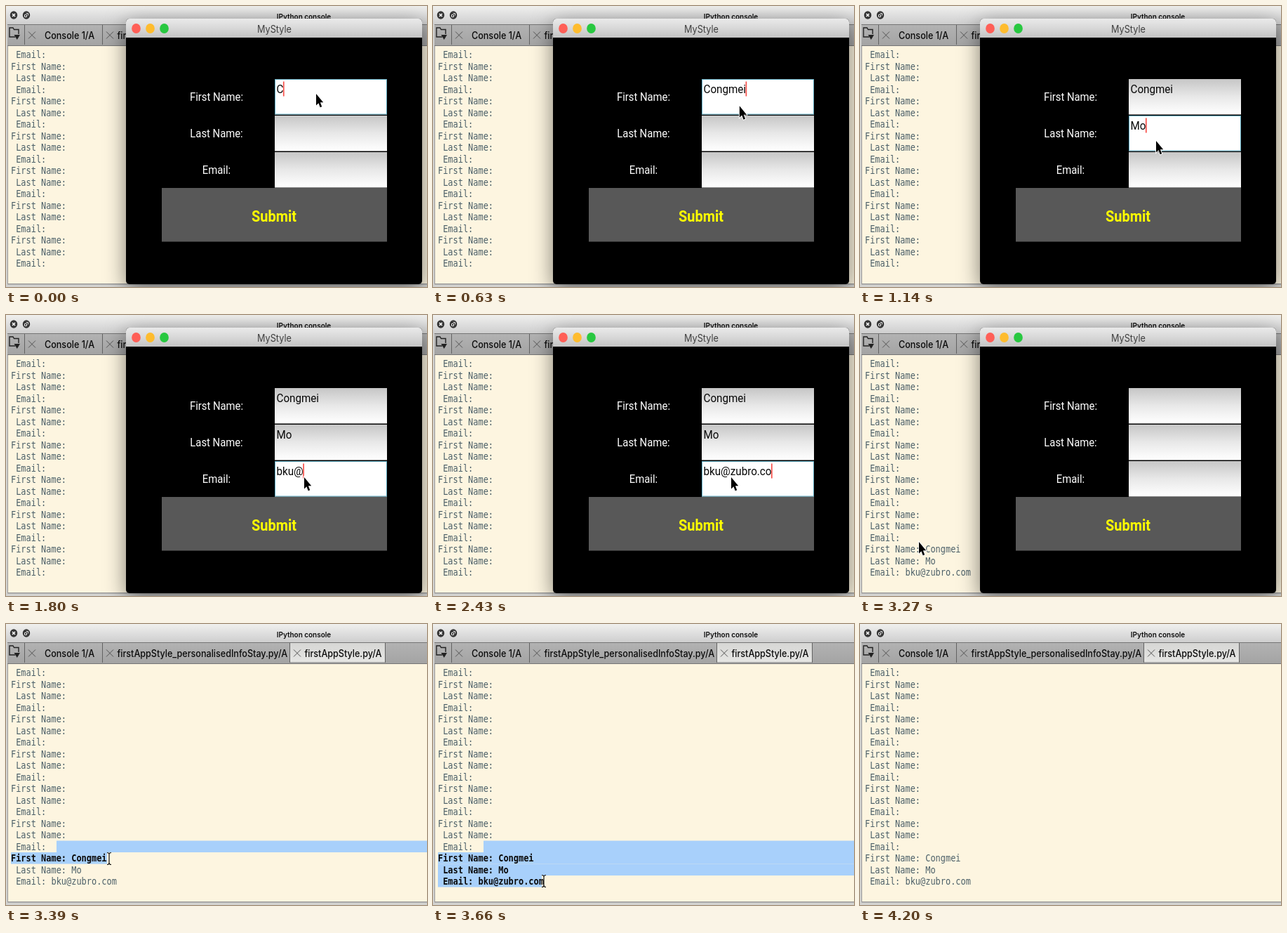
Write an HTML page with a canvas that moves like this. It is 600 px wide and 400 px high and loops after 4230 ms.

```html
<!DOCTYPE html>
<html lang="en">
<head>
<meta charset="utf-8">
<title>Form and console</title>
<style>
  html, body { margin: 0; width: 100%; height: 100%; overflow: hidden; background: #d2d2d0; }
  canvas { display: block; width: 600px; height: 400px; }
</style>
</head>
<body>
<canvas id="stage" width="600" height="400"></canvas>
<script>
const ctx = document.getElementById('stage').getContext('2d');
const LOOP = 4230, STEP = 30;
const SQUEEZE = 0.905;
const UI = 'Inter, "Open Sans", sans-serif';
const APP = 'Roboto, sans-serif';
const MONO = '13.2px "DejaVu Sans Mono", monospace';
const ROW = 16.5, TOP = 61, ROWS = 19;
const SELECTED = '#a8d0fb';

// Timeline in ms
const PRESS = 2730, RELEASE = 2970, RAISE = 3330, DESELECT = 3930, GLIDE = 270;
const fields = [
  { label: 'First Name:', value: 'Congmei', start: 0, rate: 75 },
  { label: 'Last Name:', value: 'Mo', start: 930, rate: 130 },
  { label: 'Email:', value: 'bku@zubro.com', start: 1545, rate: 80 }
];
// Pointer stops: arrival time and place
const stops = [
  { t: 0, x: 442, y: 125 }, { t: 810, x: 422, y: 192 }, { t: 1440, x: 425, y: 231 },
  { t: 2700, x: 372, y: 285 }, { t: 3270, x: 84, y: 323 }, { t: 3390, x: 147, y: 334 },
  { t: 3600, x: 158, y: 366 }, { t: 4170, x: 270, y: 425 }
];

const arrow = new Path2D('M0 0v16.5l3.4-3.3 2.3 6.1 2.5-1.1-2.3-5.9h4.3z');
const beam = new Path2D('M-3-8.5q3 0 3 2.5v12q0 2.5-3 2.5M3-8.5q-3 0-3 2.5M0 6q0 2.5 3 2.5');
const folder = new Path2D('M13 44H5V31h5l1.5 2.5H18V40');
const dropMark = new Path2D('M11.5 41H20l-4.2 7z');

function rect(x, y, w, h, fill) {
  ctx.fillStyle = fill;
  ctx.fillRect(x, y, w, h);
}

function stroke(path, color, width) {
  ctx.strokeStyle = color;
  ctx.lineWidth = width;
  ctx.stroke(path);
}

function fill(path, color) {
  ctx.fillStyle = color;
  ctx.fill(path);
}

function fade(y, h, ...colors) {
  const g = ctx.createLinearGradient(0, y, 0, y + h);
  colors.forEach((c, i) => g.addColorStop(i / (colors.length - 1), c));
  return g;
}

function text(str, x, y, font, color, align = 'left') {
  ctx.save();
  ctx.translate(x, y);
  ctx.scale(SQUEEZE, 1);
  ctx.font = font;
  ctx.fillStyle = color;
  ctx.textAlign = align;
  ctx.fillText(str, 0, 0);
  const width = ctx.measureText(str).width * SQUEEZE;
  ctx.restore();
  return width;
}

function disc(x, y, r, color) {
  const path = new Path2D();
  path.ellipse(x, y, r * SQUEEZE, r, 0, 0, Math.PI * 2);
  fill(path, color);
}

function cross(x, y, r, color, width) {
  const d = 2 * r;
  stroke(new Path2D(`M${x - r} ${y - r}l${d} ${d}m0 ${-d}l${-d} ${d}`), color, width);
}

function pointerAt(t) {
  const i = stops.findLastIndex(s => s.t <= t);
  const from = stops[i], to = stops[i + 1] || from;
  const span = Math.min(GLIDE, to.t - from.t) || 1;
  const u = Math.max(0, Math.min(1, 1 - (to.t - t) / span));
  const k = u * u * (3 - 2 * u);
  return { x: from.x + (to.x - from.x) * k, y: from.y + (to.y - from.y) * k };
}

function drawTab(name, x, w, active) {
  if (active) rect(x, 27, w, 27, fade(27, 27, '#d6d6d4', '#e6e6e4'));
  for (const edge of [x, x + w]) rect(edge, 27, 1, 28, '#626262');
  cross(x + 11, 41.5, 5, '#555', 1);
  text(name, x + (name.length < 12 ? 29 : 21.5), 46.6, '500 13.9px ' + UI, '#0c0c0c');
}

function drawChrome() {
  rect(0, 0, 600, 400, '#d2d2d0');
  rect(0, 0, 600, 27, fade(0, 27, '#f0f0ee', '#dedede', '#cdcdcd'));
  for (const x of [11, 29]) disc(x, 13, 5.8, '#363636');
  cross(11, 13, 2, '#fff', 1.5);
  stroke(new Path2D('M26.5 12.5h3v3h-3zM28.5 10.5h3v3'), '#e4e4e4', 1);
  text('IPython console', 424.5, 18.5, '600 11px ' + UI, '#101010', 'center');

  rect(2, 27, 598, 29, fade(27, 29, '#b2b2b2', '#a4a4a4'));
  for (const y of [26, 56]) rect(2, y, 598, 1, '#757575');
  stroke(folder, '#222', 1.4);
  fill(dropMark, '#222');
  drawTab('Console 1/A', 26, 111);
  drawTab('firstAppStyle_personalisedInfoStay.py/A', 137, 267);
  drawTab('firstAppStyle.py/A', 404, 136, true);
}

function drawConsole(t, pointer) {
  rect(2, 57, 598, 338, '#fdf5e0');
  rect(2, 57, 1, 338, '#999');
  rect(2, 395, 598, 1.5, '#999');
  const first = ROWS - 4;
  const selecting = t >= RAISE && t < DESELECT;
  const last = selecting ? Math.floor((pointer.y - TOP) / ROW) : -1;
  for (let i = 0; i < ROWS; i++) {
    const field = fields[(i + 2) % 3];
    const y = TOP + i * ROW;
    const chosen = i > first && i <= last;
    if (i >= first && i <= last) {
      const left = i === first ? 72 : 7;
      rect(left, y, (i < last ? 600 : pointer.x - 3) - left, ROW, SELECTED);
    }
    let str = (field === fields[0] ? '' : ' ') + field.label;
    if (i > first && t >= RELEASE) str += ' ' + field.value;
    text(str, 7, y + 13, (chosen ? 'bold ' : '') + MONO, chosen ? '#0a0a0a' : '#4c6068');
  }
}

function drawField(field, i, t) {
  const y = 104 + 52 * i;
  const next = fields[i + 1];
  const focused = t >= field.start - 75 && t < (next ? next.start - 75 : RELEASE);
  const count = t >= PRESS ? 0 : Math.max(0, Math.floor((t - field.start) / field.rate) + 1);
  text(field.label, 300, y + 31, '16.4px ' + APP, '#fff', 'center');
  rect(383, y, 160, 50.5, focused ? '#fff' : fade(y, 50, '#c6c6c6', '#e8e8e8', '#fff'));
  if (focused) {
    ctx.strokeStyle = '#62aec4';
    ctx.lineWidth = 1;
    ctx.strokeRect(383.5, y + 0.5, 159, 49.5);
  }
  const width = text(field.value.slice(0, count), 385.5, y + 19.5, '16.8px ' + APP, '#080808');
  if (focused) rect(385 + width, y + 3.5, 1.7, 21, '#f8504a');
}

function drawWindow(t) {
  ctx.save();
  ctx.shadowColor = 'rgba(0, 0, 0, .5)';
  ctx.shadowBlur = 30;
  ctx.shadowOffsetY = 8;
  const frame = new Path2D(), bar = new Path2D();
  frame.roundRect(171, 18, 422, 378, 5);
  bar.roundRect(171, 18, 422, 27, [5, 5, 0, 0]);
  fill(frame, '#000');
  ctx.restore();
  fill(bar, fade(18, 27, '#eaeaea', '#d8d8d8', '#c4c4c4'));
  ['#ff5f57', '#febc2e', '#28c840'].forEach((c, i) => disc(185.5 + 20 * i, 32, 7, c));
  text('MyStyle', 382.5, 37.5, '14px ' + UI, '#404040', 'center');

  fields.forEach((field, i) => drawField(field, i, t));
  const pressed = t >= PRESS && t < RELEASE;
  rect(222, 259, 321, 76.5, pressed ? '#2f9ac0' : '#585858');
  text(pressed ? 'Happy ^@^' : 'Submit', 382, 306.5, 'bold 22px ' + APP, '#ff0', 'center');
}

function drawPointer({ x, y }, overText) {
  ctx.save();
  ctx.translate(x, y);
  if (overText) {
    stroke(beam, '#111', 1.2);
  } else {
    stroke(arrow, '#fff', 1.8);
    fill(arrow, '#000');
  }
  ctx.restore();
}

function frame(now) {
  const t = Math.floor(now % LOOP / STEP) * STEP;
  const pointer = pointerAt(t);
  const raised = t >= RAISE;
  drawChrome();
  drawConsole(t, pointer);
  if (!raised) drawWindow(t);
  drawPointer(pointer, raised);
  requestAnimationFrame(frame);
}
requestAnimationFrame(frame);
</script>
</body>
</html>
```
